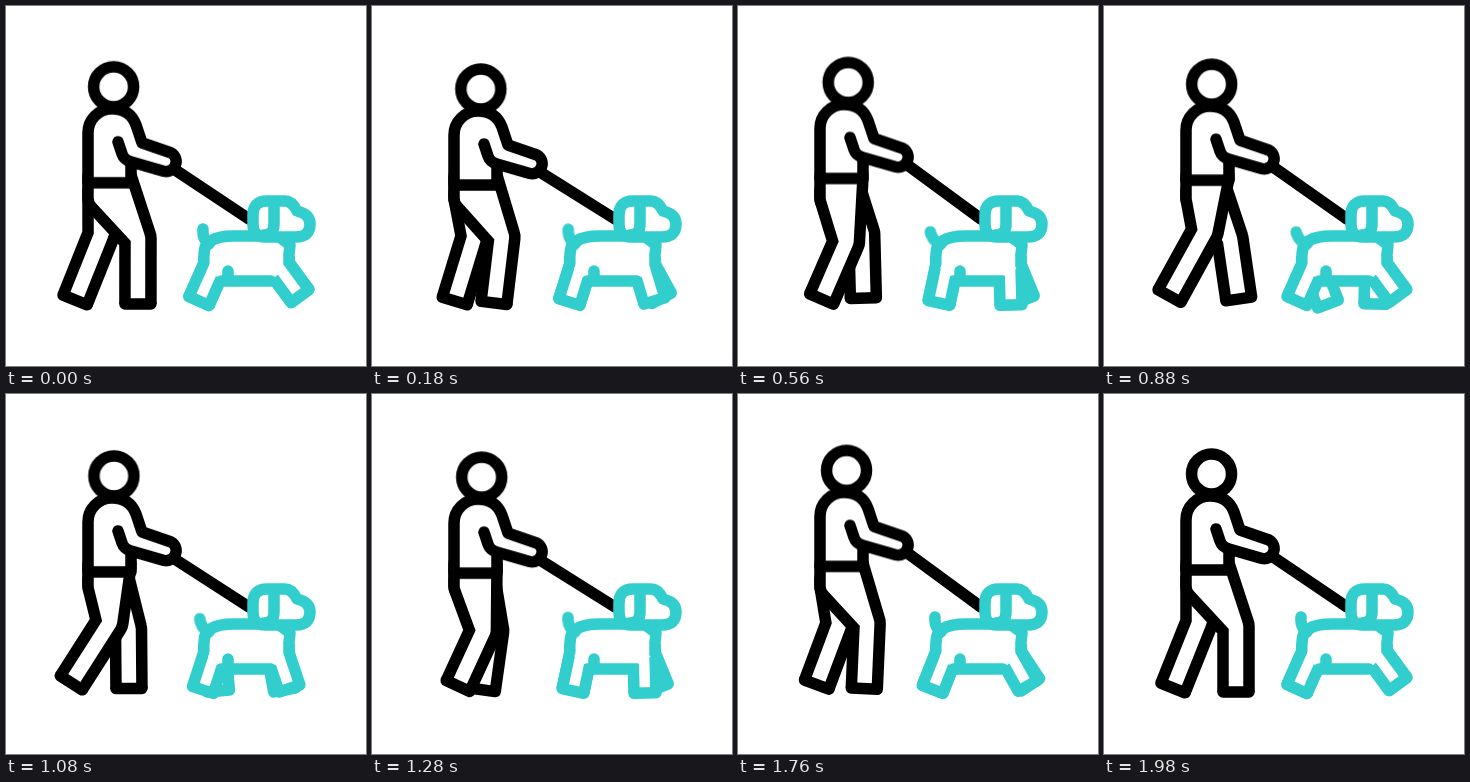
An HTML page without scripts for the animation above (2020 ms loop, 360 by 360 pixels).

```html
<!DOCTYPE html>
<html lang="en">
<head>
<meta charset="utf-8">
<title>Dog walk</title>
<style>
html, body { margin: 0; width: 100%; height: 100%; overflow: hidden; background: #fff; }
svg { display: block; width: 100vw; height: 100vh; }
path, circle { fill: #fff; stroke: currentColor; stroke-width: 11.5; stroke-linecap: round; stroke-linejoin: round; }
.man { color: #000; }
.dog { color: #32cdcd; }
.line { fill: none; }

/* A leg is a wide coloured stroke with a narrower white one on top. */
.leg { fill: none; stroke-linecap: butt; animation: 2020ms linear infinite; }
.core { stroke: #fff; }
.man .leg { stroke-width: 37.5; }
.man .core { fill: #fff; stroke-width: 14.5; marker-end: url(#shoe); }
.dog .leg { stroke-width: 33.5; animation-timing-function: ease-in-out; }
.dog .core { stroke-width: 10.5; marker-end: url(#paw); }

/* Two steps per loop */
.bob { animation: bob 1010ms -374ms ease-in-out infinite; }
.leash { animation: leash 1010ms -374ms ease-in-out infinite; }
.head { animation: nod 1010ms -55ms ease-in-out infinite; }
@keyframes bob {
  0%, 100% { transform: translateY(-5.1px); }
  62% { transform: translateY(2.2px); }
}
@keyframes leash {
  0%, 100% { d: path("M171 159.500L243 213"); }
  62% { d: path("M171 168L243 213"); }
}
@keyframes nod {
  50% { transform: translateX(3px); }
}

/* Knee, hips, knee, foot */
.near { animation-name: near; }
.far { animation-name: far; }
@keyframes near {
  0%, 98%, 100% { d: path("M132 232L112 171H95V192L132 232L132 298"); }
  17% { d: path("M128 230L112 171H95V192L128 230L113 296"); }
  28% { d: path("M108 236L112 171H95V192L108 236L83 293"); }
  44% { d: path("M101 225L112 171H95V192L101 225L65 290"); }
  51% { d: path("M102 226L112 171H95V192L102 226L60 288"); }
  63% { d: path("M111 237L112 171H95V192L111 237L85 292"); }
  79% { d: path("M127 227L112 171H95V192L127 227L122 292"); }
}
@keyframes far {
  0%, 98%, 100% { d: path("M95 229L110 185H95V192L95 229L69 294"); }
  17% { d: path("M109 232L110 185H95V192L109 232L95 296"); }
  28% { d: path("M124 228L110 185H95V192L124 228L126 292"); }
  44% { d: path("M126 233L110 185H95V192L126 233L135 293"); }
  63% { d: path("M119 237L110 185H95V192L119 237L111 296"); }
  79% { d: path("M106 231L110 185H95V192L106 231L86 288"); }
}

/* Paws spread and gather */
.hind { animation-name: hind; }
.fore { animation-name: fore; }
.hind2 { animation-name: hind2; }
.fore2 { animation-name: fore2; }
@keyframes hind {
  0%, 44%, 98%, 100% { d: path("M209 250V259L193 295"); }
  17%, 28%, 63% { d: path("M209 250V259L201 297"); }
}
@keyframes fore {
  0%, 44%, 98%, 100% { d: path("M272 250V260L294 290"); }
  17%, 28%, 63% { d: path("M272 250V260L273 299"); }
}
@keyframes hind2 {
  0%, 98%, 100% { d: path("M209 250V259L193 295"); }
  17%, 28%, 63% { d: path("M209 250V259L201 296"); }
  44% { d: path("M209 250V259L224 298"); }
}
@keyframes fore2 {
  0%, 98%, 100% { d: path("M272 250V260L294 290"); }
  17%, 28%, 63% { d: path("M272 250V260L286 294"); }
  44% { d: path("M272 250V260L271 298"); }
}
.tail { transform-origin: 203px 238px; animation: wag 2020ms ease-in-out infinite; }
@keyframes wag {
  36% { transform: rotate(-22deg); }
  75% { transform: none; }
}
</style>
</head>
<body>
<svg viewBox="0 0 360 360">
  <defs>
    <marker id="shoe" class="man" orient="auto" markerUnits="userSpaceOnUse" overflow="visible"><path d="M0 -13V13"/></marker>
    <marker id="paw" class="dog" orient="auto" markerUnits="userSpaceOnUse" overflow="visible"><path d="M0 -11V11"/></marker>
  </defs>
  <g class="man">
    <path class="leg far"/>
    <path class="leg far core"/>
    <path class="leg near"/>
    <path class="leg near core"/>
    <path class="leash line"/>
    <g class="bob">
      <path d="M112 136L116 148Q118 154 125 156L158 165.500A10 10 0 0 0 165 147L136 137L130 119Q124 103 106 103A24 24 0 0 0 82 127V177H125V158"/>
      <circle class="head" cx="107.500" cy="81" r="20"/>
    </g>
  </g>
  <g class="dog">
    <path class="leg hind2"/>
    <path class="leg hind2 core"/>
    <path class="leg fore2"/>
    <path class="leg fore2 core"/>
    <path class="leg hind"/>
    <path class="leg fore"/>
    <path stroke="none" style="stroke:none" d="M198 258L215 275H265L283 258V238H198Z"/>
    <path class="line" d="M215 275H265"/>
    <path d="M198 258V248Q198 230 228 230H272L284 239L282 258"/>
    <path class="leg hind core"/>
    <path class="leg fore core"/>
    <path class="line" d="M222 265V274"/>
    <path class="tail line" d="M197 223Q196 233 203 238"/>
    <path d="M247 218V209Q247 195 261 195H279Q286 195 291 205Q304 208 304 218Q304 231 290 231H259Q247 231 247 218Z"/>
    <path class="line" d="M268 197V218Q268 229 257.500 229"/>
  </g>
</svg>
</body>
</html>
```
